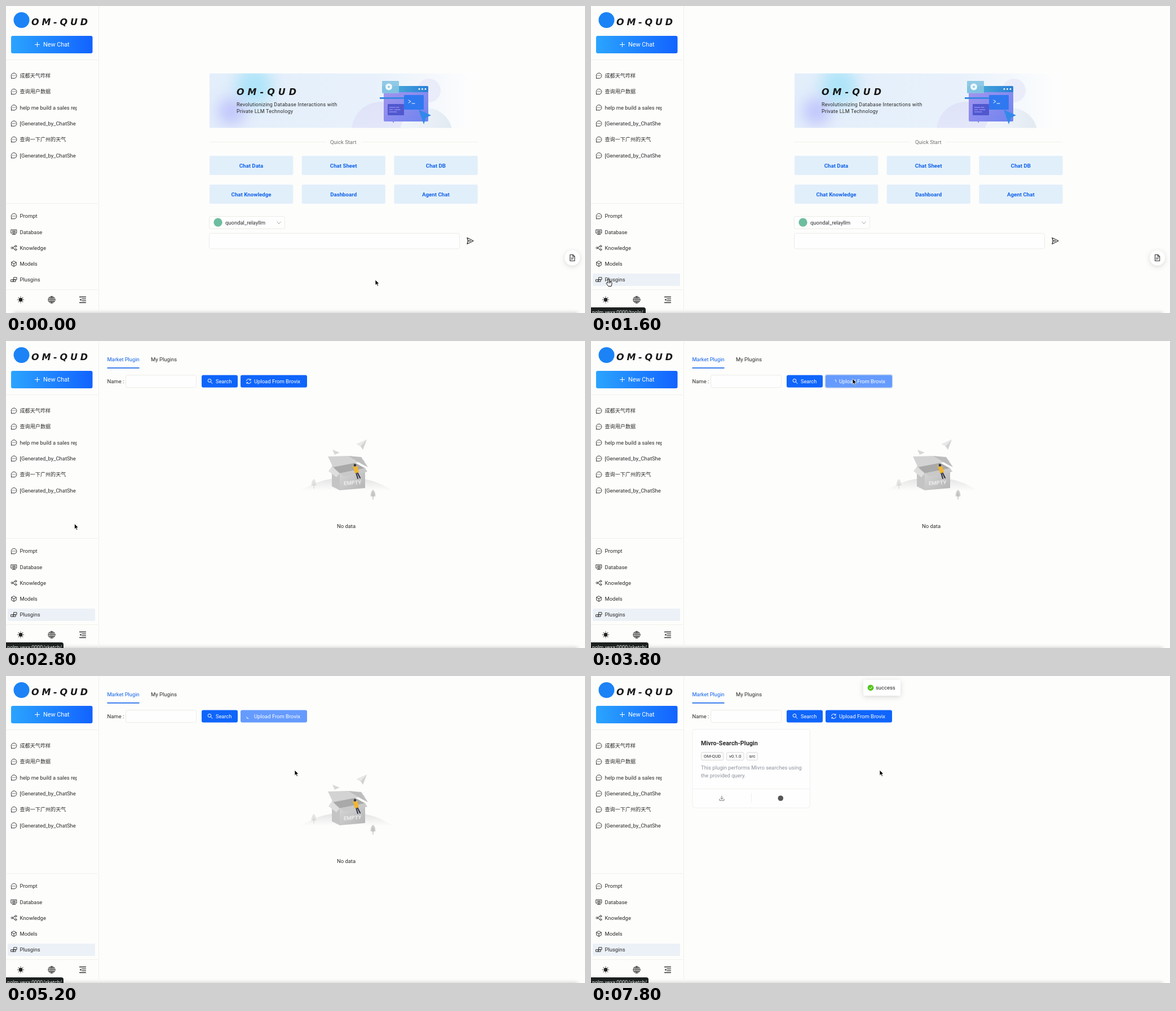
These frames come from a looping animation (1027x545 px, 8 s). An HTML page:

```html
<!DOCTYPE html>
<html lang="en">
<head>
<meta charset="utf-8">
<title>Plugin market</title>
<style>
html, body { margin: 0; width: 100%; height: 100%; overflow: hidden; background: #fdfdfc; }
svg { display: block; width: 100%; height: 100%; }
text { font: 9.45px Roboto, "Noto Sans CJK SC", "Noto Sans CJK", sans-serif; fill: #2b2b2b; white-space: pre; }
.cjk { font-size: 9.1px; }
.bold { font-weight: 600; }
.blue { fill: #1062ea; }
.white { fill: #fff; }
.mid { text-anchor: middle; }
.mark { font: italic bold 16px "DejaVu Sans", sans-serif; letter-spacing: 4.8px; fill: #161616; }
.line { fill: none; stroke: #333; stroke-linecap: round; stroke-linejoin: round; }
.rule { stroke: #f0f0ea; }
.box { fill: #fefefe; stroke: #ebebe6; }
</style>
</head>
<body>
<svg viewBox="0 0 1027 545" preserveAspectRatio="none">
  <defs>
    <linearGradient id="newChat"><stop stop-color="#2ba4fe"/><stop offset="1" stop-color="#1263ff"/></linearGradient>
    <linearGradient id="banner"><stop stop-color="#e3eefb"/><stop offset=".62" stop-color="#e8f1fb"/><stop offset=".97" stop-color="#fdfdfd"/></linearGradient>
    <linearGradient id="domeA" x2="0" y2="1"><stop stop-color="#d9d8f6"/><stop offset="1" stop-color="#e6e6fa"/></linearGradient>
    <linearGradient id="domeB"><stop stop-color="#f3f7fc"/><stop offset="1" stop-color="#dfe8f0"/></linearGradient>
    <linearGradient id="panel" x2="1" y2="1"><stop stop-color="#a796ee"/><stop offset="1" stop-color="#6d83ee"/></linearGradient>
    <linearGradient id="header"><stop stop-color="#51b9d6"/><stop offset="1" stop-color="#2b7fd9"/></linearGradient>
    <linearGradient id="hill" x2="0" y2="1"><stop stop-color="#e2e2e2"/><stop offset="1" stop-color="#fdfdfc"/></linearGradient>
    <linearGradient id="carton" x2="1" y2="1"><stop stop-color="#d9d9d9"/><stop offset="1" stop-color="#b4b4b4"/></linearGradient>
    <filter id="blur" x="-1" y="-1" width="3" height="3"><feGaussianBlur stdDeviation="13"/></filter>
    <filter id="soft" x="-.1" y="-2" width="1.2" height="5"><feGaussianBlur stdDeviation="3"/></filter>
    <filter id="shadow" x="-1" y="-1" width="3" height="3"><feDropShadow dx="0" dy="2" stdDeviation="5" flood-opacity=".15"/></filter>
    <clipPath id="bannerClip"><path d="M361 119.500h475.500v97H361z"/></clipPath>
    <clipPath id="chatClip"><path d="M0 100h125.500v180H0z"/></clipPath>
  </defs>
  <rect x="14" y="544" width="1000" height="10" fill="#ccc" filter="url(#soft)"/>
  <g id="sidebar"></g>
  <g id="home"></g>
  <g id="market"></g>
  <g id="overlay"></g>
</svg>
<script>
const $ = id => document.getElementById(id);
const text = (x, y, s, cls = '', more = '') => `<text x="${x}" y="${y}" class="${cls}" ${more}>${s}</text>`;
const rect = (x, y, w, h, r, more) => `<rect x="${x}" y="${y}" width="${w}" height="${h}" rx="${r}" ${more}/>`;
const shape = (d, fill, more = '') => `<path d="${d}" fill="${fill}" ${more}/>`;
const line = (d, more = '') => `<path class="line" d="${d}" ${more}/>`;
const rule = d => `<path class="rule" d="${d}"/>`;
const circle = (x, y, r, fill, more = '') => `<circle cx="${x}" cy="${y}" r="${r}" fill="${fill}" ${more}/>`;
const at = (x, y, body, more = '') => `<g transform="translate(${x} ${y})" ${more}>${body}</g>`;

const bubble = line('M-4.500 4.700V1.700A4.800 4.800 0 1 1 -1.700 4.700Z') +
  [-2.2, 0, 2.2].map(x => circle(x, 0, .65, '#333')).join('');
const menuIcons = [
  bubble,
  line('M-4.800 -4H4.800V2H-4.800ZM-3 4.300H3M0 2V4.300M-2.700 -1.800H2.700M-2.700 0H2.700'),
  line('M-1.800 -.7L2 -2.700M-1.800 .7L2 2.700') + [[-3.3, 0], [3.3, -3], [3.3, 3]].map(([x, y]) => circle(x, y, 1.6, 'none', 'class="line"')).join(''),
  line('M0 -4.700L4.200 -2.400V2.400L0 4.700L-4.200 2.400V-2.400ZM-4.200 -2.400L0 0L4.200 -2.400M0 0V4.700'),
  line('M-5 0H-1V3.500H-5ZM-1 0H3V3.500H-1ZM0 -4H5V0H0Z')
];

function sidebar() {
  const chats = ['成都天气咋样', '查询用户数据', 'help me build a sales rep', '[Generated_by_ChatShe', '查询一下广州的天气', '[Generated_by_ChatShe'];
  const menu = ['Prompt', 'Database', 'Knowledge', 'Models', 'Plusgins'];
  const rays = Array.from({ length: 8 }, (_, i) => `<path class="line" d="M0 -4.700V-5.600" transform="rotate(${i * 45})"/>`).join('');
  return circle(27.5, 25, 14, '#1b83f6') + text(45, 34, 'OM-QUD', 'mark') +
    rect(9, 53, 144.5, 31, 3, 'fill="url(#newChat)"') +
    line('M51.500 68.500H59.500M55.500 64.500V72.500', 'style="stroke:#fff"') +
    text(66, 72.3, 'New Chat', 'white', 'style="font-size:10.8px"') +
    rule('M0 95.500H163M0 350.500H163M0 503.500H163M164.500 0V545') +
    `<g clip-path="url(#chatClip)">` + chats.map((s, i) => {
      const y = 123.6 + i * 28.3;
      return at(14, y, bubble) + text(24.5, y + 3.4, s, /[^\x00-\x7f]/.test(s) ? 'cjk' : '');
    }).join('') + '</g>' +
    rect(3, 475, 155, 22, 2, 'id="hover" fill="#ecf1f7"') +
    menu.map((s, i) => at(14, 373 + i * 28.2, menuIcons[i]) + text(24.5, 376.4 + i * 28.2, s)).join('') +
    at(26, 521.5, circle(0, 0, 3.4, '#222') + rays) +
    at(81, 521.5, circle(0, 0, 6, 'none', 'class="line"') + line('M-6 0H6M0 -6V6M-5 -3H5M-5 3H5M0 -6C-4 -3 -4 3 0 6C4 3 4 -3 0 -6')) +
    at(136, 521.5, line('M-5.500 -5H5.500M-1 -1.700H5.500M-1 1.700H5.500M-5.500 5H5.500', 'stroke-width="1.300"') + shape('M-5.500 0L-2.500 -2V2Z', '#333'));
}

function banner() {
  const gear = Array.from({ length: 6 }, (_, i) => `<path d="M-1.300 -6H1.300V6H-1.300Z" fill="#eef8fd" transform="rotate(${i * 30})"/>`).join('');
  return `<g clip-path="url(#bannerClip)">` + rect(361, 119.5, 475.5, 97, 0, 'fill="url(#banner)"') +
    circle(440, 142, 33, '#a5e2f8', 'filter="url(#blur)" opacity=".85"') +
    circle(400, 187, 24, '#b9bdfb', 'filter="url(#blur)" opacity=".85"') +
    circle(750, 150, 21, '#ebecfa') + circle(665, 222, 52, 'url(#domeA)', 'opacity=".55"') +
    circle(745, 228, 47, 'url(#domeB)', 'opacity=".9"') + '</g>' +
    text(409, 158, 'OM-QUD', 'mark', 'style="letter-spacing:6px"') +
    ['Revolutionizing Database Interactions with', 'Private LLM Technology'].map((s, i) =>
      text(409, 177.5 + i * 12, s, '', 'style="font-size:9px;letter-spacing:.2px"')).join('') +
    rect(670, 144, 79, 61, 2, 'fill="url(#panel)"') + rect(667, 142, 82, 11, 2, 'fill="url(#header)"') +
    [733, 738.5, 744].map(x => circle(x, 147.5, 1.4, '#fff')).join('') +
    rect(667, 133, 30, 22, 1, 'fill="#86c4e2" opacity=".9"') + at(679, 143.5, gear + circle(0, 0, 4.3, '#eef8fd') + circle(0, 0, 1.8, '#86c4e2')) +
    rect(663, 162, 46, 3, 0, 'fill="#3689e2"') +
    rect(677, 174, 29, 20, 1, 'fill="#5058cf"') +
    line('M680 180H690M692 180H697M680 184H686M689 184H699M680 188H693', 'style="stroke:#b7a6ff"') +
    rect(706, 158, 35, 26, 1, 'fill="#2f78f0"') + line('M714 167L718 169.500L714 172M720 173H725', 'style="stroke:#fff"') +
    shape('M732 184L754 194L745 198L741 210Z', '#3289ea') + circle(687, 206, 1, '#6a78da');
}

function home() {
  const starts = ['Chat Data', 'Chat Sheet', 'Chat DB', 'Chat Knowledge', 'Dashboard', 'Agent Chat'];
  return banner() + rule('M361 241.500H567M630 241.500H837') + text(598.3, 245, 'Quick Start', 'mid', 'style="fill:#707070"') +
    starts.map((s, i) => {
      const x = 361 + i % 3 * 163.7, y = 266 + (i > 2) * 51;
      return rect(x, y, 148.2, 34, 2, 'fill="#e1effa"') + text(x + 74, y + 20.5, s, 'bold blue mid', 'style="font-size:9.7px"');
    }).join('') +
    rect(360.5, 373.5, 134, 22, 3, 'class="box"') + circle(376, 384.2, 7.6, '#6dbd9f') +
    text(389, 387.7, 'quondal_relayllm') + line('M481 383L484 387L487 383', 'style="stroke:#aaa"') +
    rect(360.5, 403.5, 444, 27.5, 4, 'class="box"') +
    line('M818 411.500L829 417L818 422.500L819.500 417ZM819.500 417H824', 'stroke-width="1.300"') +
    circle(1004.5, 447, 13.3, '#fff', 'filter="url(#shadow)"') +
    line('M1000.500 441.500H1005.500L1008.700 444.700V452.500H1000.500ZM1005.300 441.500V445H1008.700M1002.500 447.500H1006.500M1002.500 449.800H1005', 'stroke-width="1.100"');
}

function emptyBox() {
  const tree = (x, y, s) => at(x, y, shape('M0 -8C3 -6 5 0 4 4H-4C-5 0 -3 -6 0 -8', '#cecece') + line('M0 -2V9', 'style="stroke:#aaa"'), `opacity="${s}"`);
  return shape('M522 266C550 250 570 243 605 242C640 243 662 250 686 266Z', 'url(#hill)') +
    tree(546, 253, .5) + tree(651, 272, 1) +
    shape('M622 183L640 175L633 193L629 187Z', '#d2d2d2') + shape('M622 183L640 175L629 187Z', '#e8e8e8') +
    shape('M579 193L592 198L583 202Z', '#d8d8d8') +
    shape('M578 223L592 234V265L578 258Z', '#c4c4c4') + shape('M578 222L606 209L637 226L592 235Z', '#a9a9a9') +
    shape('M592 235L637 226V261L592 265Z', 'url(#carton)') +
    shape('M571 205L607 204L637 213L580 224Z', '#d3d3d3') + shape('M607 204L630 206L642 224L632 219Z', '#bdbdbd') +
    shape('M578 223L592 235L586 242L572 231Z', '#dedede') + shape('M592 235L637 226L641 232L600 240Z', '#c9c9c9') +
    text(0, 0, 'EMPTY', 'bold', 'transform="translate(599 256) rotate(-4) skewX(-4)" style="fill:#ededed"') +
    line('M621 234L624 244M623 233L628 243', 'style="stroke:#2c3140;stroke-width:2"') +
    shape('M616 224L623 222L626 233L619 235Z', '#f3b62d') + line('M617 226L614 221', 'style="stroke:#f3b62d"') + circle(619, 220.5, 2.2, '#333') +
    text(603.5, 331.5, 'No data', 'mid');
}

function card() {
  const tags = [[195.5, 39.5, 'OM-QUD'], [240.5, 30.5, 'v0.1.0'], [276.5, 19, 'src']];
  return rect(180, 94.5, 208.500, 139.5, 4, 'fill="#fefefe" stroke="#efeff0"') +
    text(195, 123.3, 'Mivro-Search-Plugin', 'bold', 'style="font-size:10.8px"') +
    tags.map(([x, w, s]) => rect(x, 135.5, w, 14, 2, 'fill="#fafafa" stroke="#dededb"') + text(x + w / 2, 145.4, s, 'mid', 'style="font-size:8px"')).join('') +
    text(195, 165.7, 'This plugin performs Mivro searches using', '', 'style="fill:#8d929d"') +
    text(195, 180, 'the provided query.', '', 'style="fill:#8d929d"') +
    rule('M180 200.500H388M284.500 208V225') +
    line('M232 213V218.500M229.700 216.500L232 218.800L234.300 216.500M228 218.500V221H236V218.500', 'style="stroke:#777"') +
    circle(336.3, 217, 4.8, '#555');
}

function market() {
  return text(179.5, 36.2, 'Market Plugin', 'blue', 'style="font-size:9.3px"') + text(257, 36.2, 'My Plugins') +
    rect(179.5, 47, 57, 1.6, 0, 'id="ink" fill="#1062ea"') +
    '<g id="content">' + text(179.5, 75, 'Name :') + rect(212.5, 60.5, 125, 22, 3, 'class="box"') +
    rect(347, 60.5, 64, 22, 3, 'fill="#0f65fb"') + circle(361, 70.3, 2.9, 'none', 'stroke="#fff"') +
    line('M363.300 72.600L366 75.500', 'style="stroke:#fff"') + text(372, 75, 'Search', 'white', 'style="font-size:9.2px"') +
    rect(414.5, 59, 121, 25, 4, 'id="wave" fill="#cfdcec"') +
    rect(416, 60.5, 118, 22, 3, 'id="upload" fill="#0f65fb"') +
    at(430.5, 71.5, line('M-4 -.8A4 4 0 0 1 3.300 -2.300M4 .8A4 4 0 0 1 -3.300 2.300M3.500 -4V-2H1.500M-3.500 4V2H-1.500', 'style="stroke:#fff"'), 'id="sync"') +
    '<g id="spinner">' + line('M3.600 -2A4.100 4.100 0 0 1 3.600 2', 'style="stroke:#fff"') + '</g>' +
    text(440, 75, 'Upload From Brovix', 'white') +
    `<g id="empty">${emptyBox()}</g><g id="card">${card()}</g></g>`;
}

function overlay() {
  return '<g id="toast">' + rect(483, 7, 66, 28, 4, 'fill="#fff" filter="url(#shadow)"') + circle(496, 20.8, 5.4, '#52c41a') +
    line('M493.600 21L495.500 22.900L498.600 19', 'style="stroke:#fff"') + text(505, 24.3, 'success') + '</g>' +
    '<g id="status">' + shape('M0 535H93Q97 535 97 539V545H0Z', '#1c211f', 'id="statusBox"') +
    text(2, 546.7, '', '', 'id="address" style="font-size:9px;fill:#e9ecea"') + '</g>' +
    '<g id="pointer"><g id="arrow">' + shape('M0 0V9.600L2.200 7.600L3.800 11.200L5.500 10.400L3.900 7H7Z', '#000', 'stroke="#fff" stroke-width=".8"') + '</g>' +
    '<g id="hand">' + shape('M-1.200 7V1Q-1.200 -.2 0 -.2Q1.200 -.2 1.200 1V4.300L5 5Q6.300 5.500 6.100 7.500L5 12.500H-.2L-3.900 7.500Q-4 6 -2.600 6.200Z', '#fff', 'stroke="#111" stroke-width="1"') +
    line('M1.200 5V7M3.100 5V7') + '</g></g>';
}

for (const build of [sidebar, home, market, overlay]) $(build.name).innerHTML = build();

// Pointer stops: time, x, y
const route = [[0, 655, 486], [200, 655, 486], [1000, 37, 485], [1200, 31, 485], [2000, 31, 485],
  [2600, 58, 372], [3400, 464, 67], [4200, 464, 67], [4800, 512, 167], [8000, 512, 167]];

function pointerAt(t) {
  const i = route.findIndex(stop => stop[0] > t);
  const [t0, x0, y0] = route[i - 1], [t1, x1, y1] = route[i];
  const p = (t - t0) / (t1 - t0), k = p * p * (3 - 2 * p);
  return [x0 + (x1 - x0) * k, y0 + (y1 - y0) * k];
}

const show = (id, on) => { $(id).style.display = on ? '' : 'none'; };

function render(t) {
  const open = t >= 1800, done = t >= 7800, uploading = t >= 3600 && t < 7600;
  const fading = t === 1800 || t === 7600;
  const hand = t >= 1200 && t <= 2600 || t >= 3400 && t < 3800;
  show('home', !open);
  show('market', open);
  show('hover', t >= 1200);
  show('empty', !done);
  show('card', done);
  show('sync', !uploading);
  show('spinner', uploading);
  show('wave', t === 3600 || t === 3800);
  show('toast', t >= 7600);
  show('status', t >= 1400);
  show('arrow', !hand);
  show('hand', hand);
  $('ink').setAttribute('width', t === 1800 ? 38 : 57);
  $('content').setAttribute('opacity', fading ? .65 : 1);
  $('upload').setAttribute('fill', uploading ? '#659bfe' : '#0f65fb');
  $('spinner').setAttribute('transform', `translate(430.5 71.5) rotate(${(t - 3800) * .36 - 15})`);
  $('toast').setAttribute('opacity', done ? 1 : .7);
  $('toast').setAttribute('transform', `translate(0 ${done ? 0 : -6})`);
  const prompt = t >= 2600;
  $('address').textContent = prompt ? 'nolm.vexa:0000/sketch/' : 'nolm.vexa:0000/tools/';
  $('statusBox').setAttribute('d', `M0 535H${prompt ? 98 : 93}q4 0 4 4V545H0Z`);
  $('pointer').setAttribute('transform', `translate(${pointerAt(t)})`);
}

function tick() {
  render(Math.floor(performance.now() % 8000 / 200) * 200);
  requestAnimationFrame(tick);
}
tick();
</script>
</body>
</html>
```
